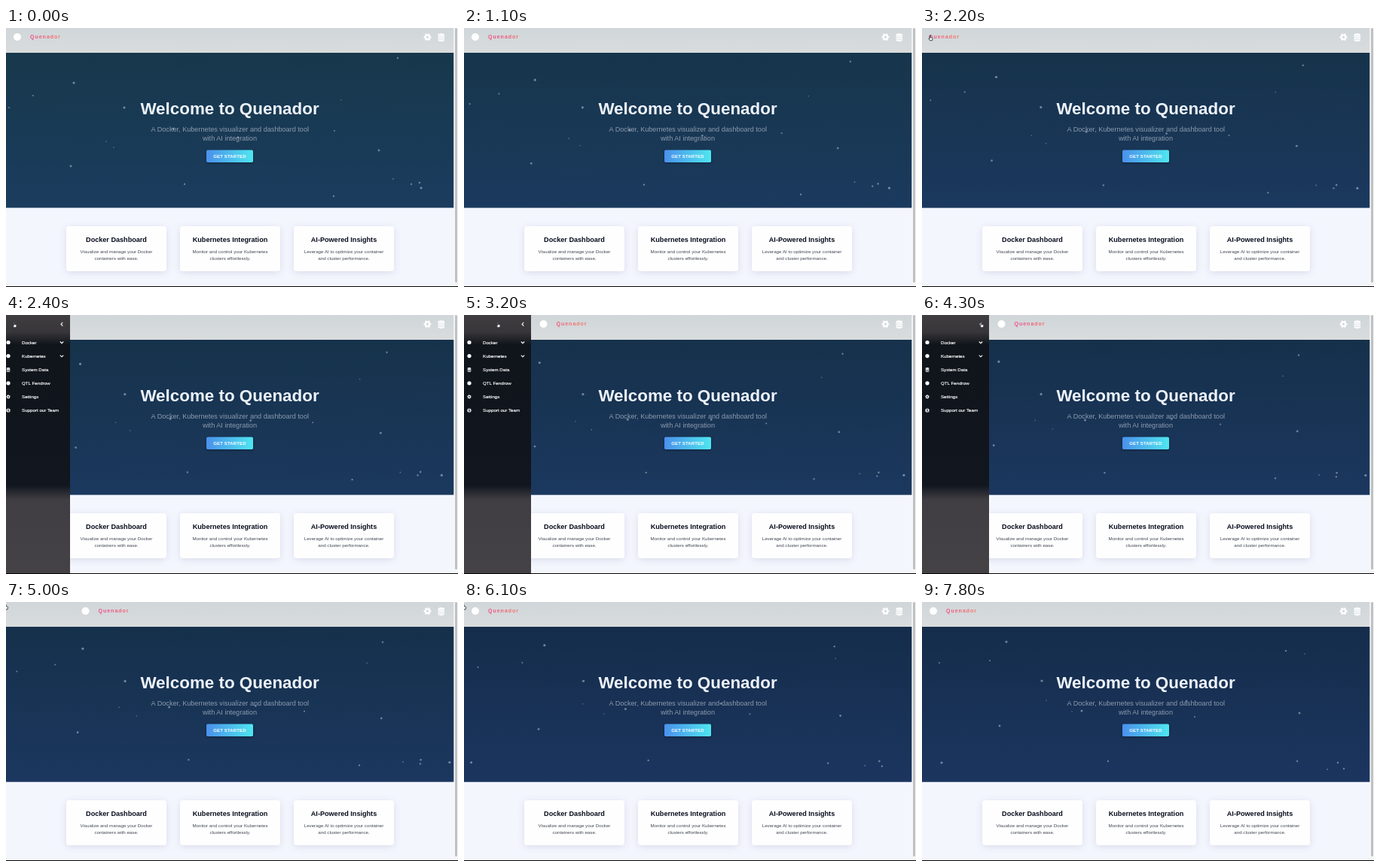
Animation of 600 by 345 pixels, one loop 8000 ms. Source, as an HTML page:

```html
<!DOCTYPE html>
<html lang="en">
<head>
<meta charset="utf-8">
<title>Dashboard welcome page</title>
<style>
  html, body { margin: 0; width: 100%; height: 100%; overflow: hidden; background: #f4f6fe; }
  svg { display: block; width: 600px; height: 345px; font-family: "Liberation Sans", Arial, sans-serif; }
  .mid { text-anchor: middle; }
  .bold { font-weight: 700; }
  .card rect { fill: #fefeff; filter: drop-shadow(0 2px 5px rgba(40, 50, 90, .13)); }
  .card .bold { font-size: 9.1px; fill: #080d1c; }
  .card .note { font-size: 6.2px; fill: #414751; }
  #menu { font-size: 6.2px; fill: #fff; }
  #menu text { stroke: #fff; stroke-width: .16; }
  .line { fill: none; stroke: #fff; stroke-width: 1.1; }
</style>
</head>
<body>
<svg viewBox="0 0 600 345">
  <defs>
    <linearGradient id="bar" x2="0" y2="1"><stop stop-color="#d0d6d9"/><stop offset="1" stop-color="#d9dcdd"/></linearGradient>
    <linearGradient id="teal" x2="0" y2="1"><stop stop-color="#17384b"/><stop offset="1" stop-color="#1b3c5e"/></linearGradient>
    <linearGradient id="navy" x2="0" y2="1"><stop stop-color="#152d4b"/><stop offset="1" stop-color="#1b355f"/></linearGradient>
    <linearGradient id="cta"><stop stop-color="#4a91ec"/><stop offset="1" stop-color="#4fe6ef"/></linearGradient>
    <linearGradient id="brandInk" gradientUnits="userSpaceOnUse" x1="0" x2="42" spreadMethod="reflect"><stop stop-color="#ec4f86"/><stop offset="1" stop-color="#f5796b"/></linearGradient>
    <linearGradient id="panel" x2="0" y2="1">
      <stop stop-color="#403d41"/><stop offset=".065" stop-color="#383639"/><stop offset=".115" stop-color="#10151b"/>
      <stop offset=".66" stop-color="#11161f"/><stop offset=".715" stop-color="#403e43"/><stop offset="1" stop-color="#454246"/>
    </linearGradient>
    <symbol id="gear" viewBox="-6 -6 12 12" overflow="visible">
      <circle r="2.7" fill="none" stroke="#fff" stroke-width="2.2"/>
      <circle r="4.1" fill="none" stroke="#fff" stroke-width="1.7" pathLength="12" stroke-dasharray="1.1 .9" stroke-dashoffset=".55"/>
    </symbol>
    <symbol id="store" viewBox="-6 -6 12 12" overflow="visible">
      <g fill="#fff">
        <ellipse cy="-3.3" rx="4.3" ry="1.6"/>
        <path id="band" d="M-4.3-2.1Q0 .3 4.3-2.1V-.4Q0 2-4.3-.4Z"/>
        <use href="#band" y="2.5"/><use href="#band" y="4.9"/>
      </g>
    </symbol>
  </defs>

  <rect width="600" height="345" fill="#f4f6fe"/>
  <rect width="594.5" height="33.5" fill="url(#bar)"/>
  <rect y="33" width="594.5" height="206.5" fill="url(#teal)"/>
  <rect id="tint" y="33" width="594.5" height="206.5" fill="url(#navy)"/>

  <g id="brand">
    <circle id="logo" cx="-17" cy="12" r="5" fill="#fff"/>
    <text class="bold" y="14.4" font-size="7" letter-spacing="1" fill="url(#brandInk)">Quenador</text>
  </g>
  <use href="#gear" x="553.5" y="6.2" width="12" height="12"/>
  <use href="#store" x="571.8" y="6.2" width="12" height="12"/>

  <text class="mid bold" x="297" y="115" font-size="22.4" fill="#edf2fb">Welcome to Quenador</text>
  <g class="mid" font-size="9.15" fill="#8d9bae">
    <text x="297.3" y="138">A Docker, Kubernetes visualizer and dashboard tool</text>
    <text x="297" y="150">with AI integration</text>
  </g>
  <rect x="266" y="162.5" width="62" height="16.5" rx="1.8" fill="url(#cta)" style="filter:drop-shadow(0 1px 1.5px rgba(0,0,0,.35))"/>
  <text class="mid bold" x="297" y="172.6" font-size="6" letter-spacing=".15" fill="#fff">GET STARTED</text>

  <g id="dots" fill="#c3d0de"></g>
  <g id="cards"></g>

  <g id="drawer">
    <rect width="89" height="344" fill="url(#panel)"/>
    <path class="line" d="M79.3 9.8L77 12.2L79.3 14.6"/>
    <g id="menu"></g>
  </g>

  <rect x="594.5" width="5.5" height="344" fill="#f7f7f8"/>
  <rect x="596" width="3" height="339" rx="1.5" fill="#bfc0c3"/>
  <rect y="344" width="600" height="1" fill="#050505"/>

  <path id="hand" d="M-1.2-3.2Q-.6-4 0-3.2V-.8L2.2-.2Q2.8 0 2.6 1L2 3.4H-1L-2.6.8Q-2.4 0-1.2.9Z" fill="#f4f4f4" stroke="#20242a" stroke-width=".8"/>
</svg>

<script>
const LOOP = 8000;
const $ = id => document.getElementById(id);

// x and y at the start, x and y at the end, radius
const DOTS = [
  [90, 73, 112, 53, 1.6], [4, 106, 23, 81, 1.1], [36, 90, 90, 78, 1.1], [157, 106, 159, 105, 1.6],
  [133, 151, 165, 131, .8], [143, 159, 199, 146, .8], [86, 184, 103, 165, 1.4], [222, 134, 212, 145, 1.5],
  [237, 208, 247, 212, 1.2], [308, 146, 351, 132, 1.4], [436, 137, 362, 153, 1.1], [445, 96, 508, 69, .8],
  [520, 40, 483, 65, 1.2], [495, 163, 501, 148, 1.4], [435, 224, 498, 212, 1.2], [514, 201, 538, 223, .9],
  [538, 208, 560, 222, 1.2], [549, 206, 552, 214, 1.3], [551, 213, 621, 214, 1.6]
];
const DRIFT = [[0, 0], [2200, .385], [2400, .39], [3000, .47], [3900, .47], [4100, .54], [5000, .54], [6100, .765], [7800, 1], [8000, 1.03]];
const HAND_X = [[2500, 11.5], [3900, 79.5], [4300, 79.5], [4700, 0]];
const HAND_Y = [[4300, 13.3], [4700, 6.5]];

const CARDS = [
  [80, "Docker Dashboard", "Visualize and manage your Docker", "containers with ease."],
  [231, "Kubernetes Integration", "Monitor and control your Kubernetes", "clusters effortlessly."],
  [382, "AI-Powered Insights", "Leverage AI to optimize your container", "and cluster performance."]
];
const disc = '<circle r="2.6" fill="#fff"/>';
const icon = name => `<use href="#${name}" x="-3.3" y="-3.3" width="6.6" height="6.6"/>`;
const coin = disc + '<path d="M.9-1Q-.9-1.6-.9-.6T.9.6T-.9 1M0-1.8V1.8" fill="none" stroke="#11161f" stroke-width=".6"/>';
const MENU = [
  ["Docker", disc, true], ["Kubernetes", disc, true], ["System Data", icon("store")],
  ["QTL Fendrow", disc], ["Settings", icon("gear")], ["Support our Team", coin]
];

$("cards").innerHTML = CARDS.map(([x, title, first, second]) => `
  <g class="card mid" transform="translate(${x} 264)">
    <rect width="133" height="60" rx="4"/>
    <text class="bold" x="66.5" y="21">${title}</text>
    <text class="note" x="66.5" y="36.3">${first}</text>
    <text class="note" x="66.5" y="45.3">${second}</text>
  </g>`).join("");

$("menu").innerHTML = MENU.map(([label, mark, opens], i) => `
  <g transform="translate(0 ${36.5 + i * 18.1})">
    <g transform="translate(7 0)">${mark}</g>
    <text x="25" y="2.1">${label}</text>
    ${opens ? '<path class="line" d="M75.8-1L78 1.2L80.2-1"/>' : ""}
  </g>`).join("");

$("dots").innerHTML = DOTS.map(([, , , , r]) => `<circle r="${r}" opacity="${.32 + r * .13}"/>`).join("");
const dots = [...$("dots").children];

const clamp = v => Math.min(1, Math.max(0, v));
const move = (el, x, y = 0) => el.setAttribute("transform", `translate(${x} ${y})`);
const show = (el, on) => el.setAttribute("visibility", on ? "visible" : "hidden");

function track(steps, t) {
  if (t <= steps[0][0]) return steps[0][1];
  const i = steps.findIndex(step => step[0] > t);
  if (i < 0) return steps.at(-1)[1];
  const [t0, v0] = steps[i - 1], [t1, v1] = steps[i];
  return v0 + (v1 - v0) * (t - t0) / (t1 - t0);
}

function draw(t) {
  const drift = track(DRIFT, t);
  DOTS.forEach(([x0, y0, x1, y1], i) =>
    move(dots[i], (x0 + (x1 - x0) * drift) % 595, y0 + (y1 - y0) * drift));
  $("tint").setAttribute("opacity", clamp(drift * 1.3));

  const opened = 1 - (1 - clamp((t - 2220) / 280)) ** 3;
  const closed = clamp((t - 4300) / 200) ** 2;
  move($("drawer"), -90 * (1 - opened + closed));

  const bare = t >= 2200 && t < 2500;
  move($("brand"), bare ? 9 : t >= 2500 && t < 5200 ? 122.5 : 32);
  show($("logo"), !bare);
  $("brandInk").setAttribute("gradientTransform", `translate(${12 * Math.sin(t / LOOP * 4 * Math.PI)})`);

  move($("hand"), track(HAND_X, t), track(HAND_Y, t));
  show($("hand"), t >= 2200 && t < 6600);
}

const start = performance.now();
function tick() {
  draw((performance.now() - start) % LOOP);
  requestAnimationFrame(tick);
}
tick();
</script>
</body>
</html>
```
